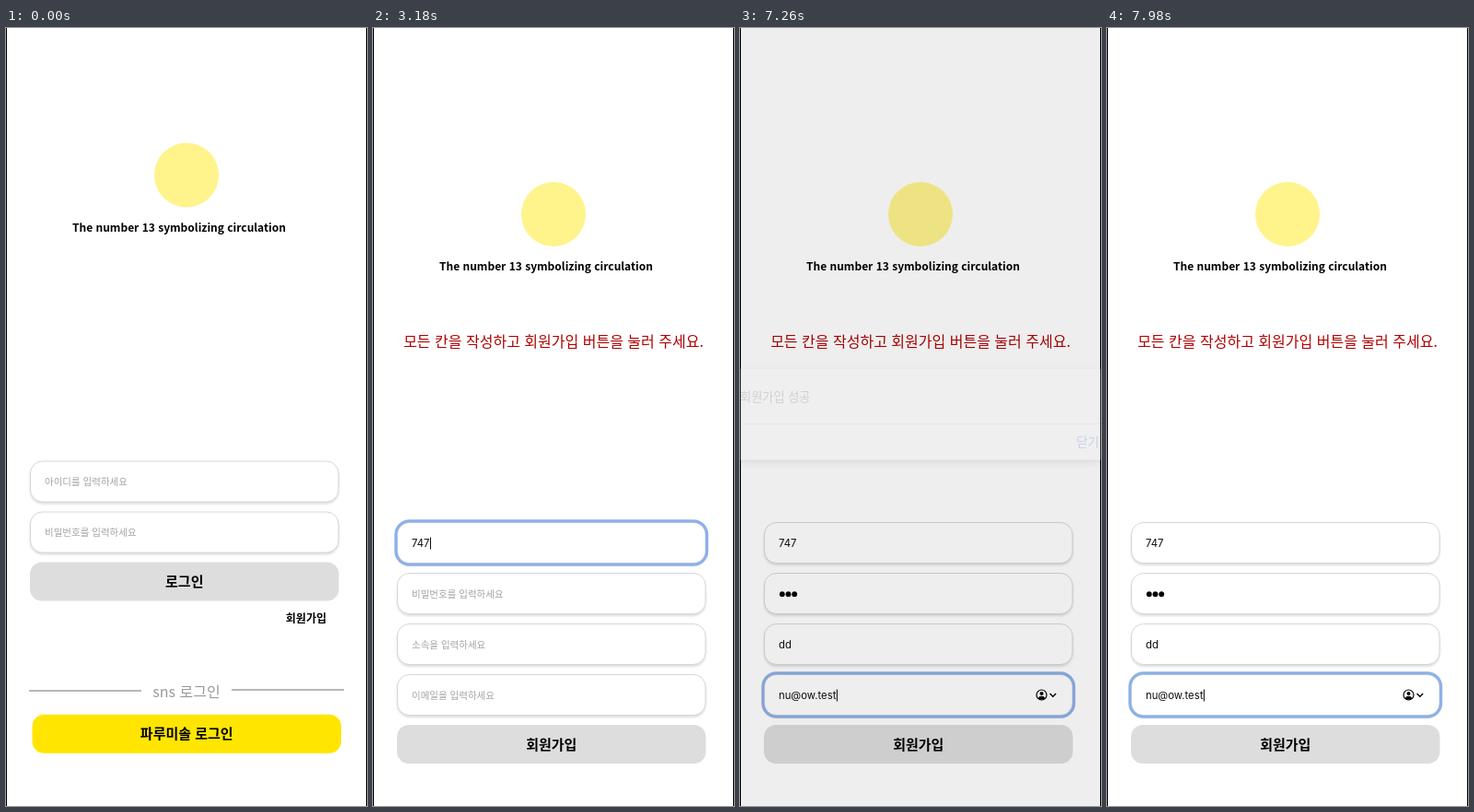
Animation of 392x844 px, one loop 8000 ms. Source, as an HTML page:

```html
<!DOCTYPE html>
<html lang="ko">
<head>
<meta charset="utf-8">
<title>회원가입</title>
<style>
  html, body { margin: 0; width: 100%; height: 100%; overflow: hidden; background: #fff; }
  svg { display: block; width: 392px; height: 844px; }
  text { font-family: "Noto Sans CJK KR", "Noto Sans CJK", "Noto Sans", sans-serif; white-space: pre; }
  .box { fill: #fff; stroke: #d6d6d6; filter: drop-shadow(0 2px 1px rgba(0, 0, 0, .13)); }
  .ring { fill: none; stroke: #8db0e8; stroke-width: 3.2; }
  .hint { font-size: 10.5px; fill: #a3a3a3; }
  .value { font: 11.3px Inter, sans-serif; fill: #0c0c0c; }
  .button { font-size: 15px; font-weight: 700; text-anchor: middle; }
  .card { fill: #f4f4f4; filter: drop-shadow(0 3px 5px rgba(0, 0, 0, .4)); }
</style>
</head>
<body>
<svg id="stage" viewBox="0 0 392 844"></svg>
<script>
const LOOP = 8000, STEP = 30, LEFT = 42;
const stage = document.getElementById('stage');

function add(parent, tag, attrs = {}, text) {
  const el = document.createElementNS('http://www.w3.org/2000/svg', tag);
  for (const key in attrs) el.setAttribute(key, attrs[key]);
  if (text !== undefined) el.textContent = text;
  parent.appendChild(el);
  return el;
}
const show = (el, on) => el.setAttribute('visibility', on ? 'inherit' : 'hidden');
const group = parent => add(parent, 'g');

function header(parent, dy) {
  const g = group(parent);
  add(g, 'circle', { cx: 196, cy: 159.5 + dy, r: 35, fill: '#fff38c' });
  add(g, 'text', { x: 72, y: 220.5 + dy, 'font-size': 12, 'font-weight': 700 },
    'The number 13 symbolizing circulation');
  return g;
}

function button(parent, x, y, w, label, fill) {
  add(parent, 'rect', { x, y, width: w, height: 42, rx: 13, fill });
  add(parent, 'text', { class: 'button', x: x + w / 2, y: y + 26.5 }, label);
}

function field(parent, y, hint, secret) {
  const mid = y + 22.2;
  add(parent, 'rect', { class: 'box', x: 26.5, y, width: 334.5, height: 44, rx: 13 });
  const ring = add(parent, 'rect', { class: 'ring', x: 24.9, y: y - 1.6, width: 337.7, height: 47.2, rx: 14.6 });
  const label = add(parent, 'text', { class: 'hint', x: LEFT, y: mid + 3.9 }, hint);
  const value = add(parent, 'text', { class: 'value', x: LEFT, y: mid + 4.1 });
  const dots = secret ? [0, 1, 2].map(i =>
    add(parent, 'circle', { cx: 45.8 + i * 6.7, cy: mid + .5, r: 2.9 })) : [];
  const caret = add(parent, 'rect', { y: mid - 6.2, width: 1, height: 13, fill: '#000' });
  return (text, focus, blink) => {
    show(ring, focus);
    show(label, !text);
    show(caret, focus && !blink);
    value.textContent = secret ? '' : text;
    dots.forEach((dot, i) => show(dot, i < text.length));
    const width = secret ? text.length * 6.7 : text ? value.getComputedTextLength() : 0;
    caret.setAttribute('x', LEFT + width + (text ? .5 : 0));
  };
}

add(stage, 'rect', { width: 392, height: 844, fill: '#fff' });

// Login screen
const login = group(stage);
header(login, 0);
const loginId = field(login, 470, '아이디를 입력하세요');
const loginPass = field(login, 525, '비밀번호를 입력하세요', true);
button(login, 26, 579.5, 335.5, '로그인', '#ddd');
add(login, 'text', { x: 348, y: 645, 'font-size': 12, 'font-weight': 700, 'text-anchor': 'end' }, '회원가입');
add(login, 'path', { d: 'M25 719H147M245 718H367', stroke: '#a0a0a0', 'stroke-width': 1.3 });
add(login, 'text', { x: 196, y: 726, 'font-size': 16, fill: '#999', 'text-anchor': 'middle' }, 'sns 로그인');
button(login, 28.5, 744.7, 335.5, '파루미솔 로그인', '#ffe500');

// Sign-up screen
const signup = group(stage);
const banner = header(signup, 42.5);
const form = group(signup);
add(form, 'text', { x: 196, y: 288, 'font-size': 16, fill: '#b00000', 'text-anchor': 'middle' },
  '모든 칸을 작성하고 회원가입 버튼을 눌러 주세요.');
const fields = ['아이디를', '비밀번호를', '소속을', '이메일을'].map((name, i) =>
  field(form, 478.5 + i * 55, name + ' 입력하세요', i === 1));
button(form, 26, 698, 335.5, '회원가입', '#ddd');

const icon = group(form);
add(icon, 'circle', { cx: 327.5, cy: 665.5, r: 5.5, fill: 'none', stroke: '#000', 'stroke-width': 1.2 });
add(icon, 'circle', { cx: 327.5, cy: 664, r: 2 });
add(icon, 'path', { d: 'M323.7 669.2Q324.5 666.8 327.5 666.8T331.3 669.2Q327.5 672 323.7 669.2Z' });
add(icon, 'path', { d: 'M336.5 664l3.3 3.3 3.3-3.3', fill: 'none', stroke: '#000', 'stroke-width': 1.4 });

// Dialog
const scrim = add(stage, 'rect', { width: 392, height: 844 });
add(stage, 'path', { d: 'M.5 0V844M391.5 0V844', stroke: '#000' });
const dialog = group(stage);
add(dialog, 'rect', { class: 'card', y: 370, width: 392, height: 98.5 });
add(dialog, 'path', { d: 'M0 429.5H392', stroke: '#cfcfcf' });
add(dialog, 'text', { x: 0, y: 405, 'font-size': 13.2, fill: '#5c5c5c' }, '회원가입 성공');
add(dialog, 'text', { x: 390, y: 454, 'font-size': 13.5, 'font-weight': 500, fill: '#1a6fd0', 'text-anchor': 'end' }, '닫기');

const focusAt = [2580, 3420, 4170, 4800];
const typing = [
  [[2820, '7'], [3030, '74'], [3180, '747']],
  [[3630, '*'], [3810, '**'], [3990, '***']],
  [[4470, 'd'], [4620, 'dd']],
  [[4980, 'n'], [5100, 'nu'], [5430, 'nu@'], [5640, 'nu@o'], [5790, 'nu@ow'],
   [5910, 'nu@ow,'], [6030, 'nu@ow,t'], [6120, 'nu@ow,te'],
   [6450, 'nu@ow,t'], [6540, 'nu@ow,'], [6630, 'nu@ow'],
   [6810, 'nu@ow.'], [6870, 'nu@ow.t'], [6930, 'nu@ow.te'], [6990, 'nu@ow.tes'], [7080, 'nu@ow.test']]
];
const valueAt = (keys, t) => keys.reduce((v, [at, text]) => t >= at ? text : v, '');
const clamp = v => Math.max(0, Math.min(1, v));

function render(time) {
  const t = Math.floor(time / STEP) * STEP;
  const onLogin = t < 2100, loaded = t >= 2130;
  show(login, onLogin);
  show(signup, !onLogin);
  loginId('', t >= 1290 && t < 1980, t >= 1770);
  loginPass('', false);

  show(banner, loaded);
  form.setAttribute('transform', `translate(0 ${loaded ? 58 : 0})`);
  const active = focusAt.filter(at => t >= at).length - 1;
  fields.forEach((set, i) => set(valueAt(typing[i], t), i === active));
  show(icon, active === 3);

  const fade = Math.min(clamp((t - 7230) / 150), clamp((7980 - t) / 120));
  scrim.setAttribute('opacity', .33 * fade);
  dialog.setAttribute('opacity', fade);
}

const start = performance.now();
function tick() {
  render((performance.now() - start) % LOOP);
  requestAnimationFrame(tick);
}
tick();
</script>
</body>
</html>
```
